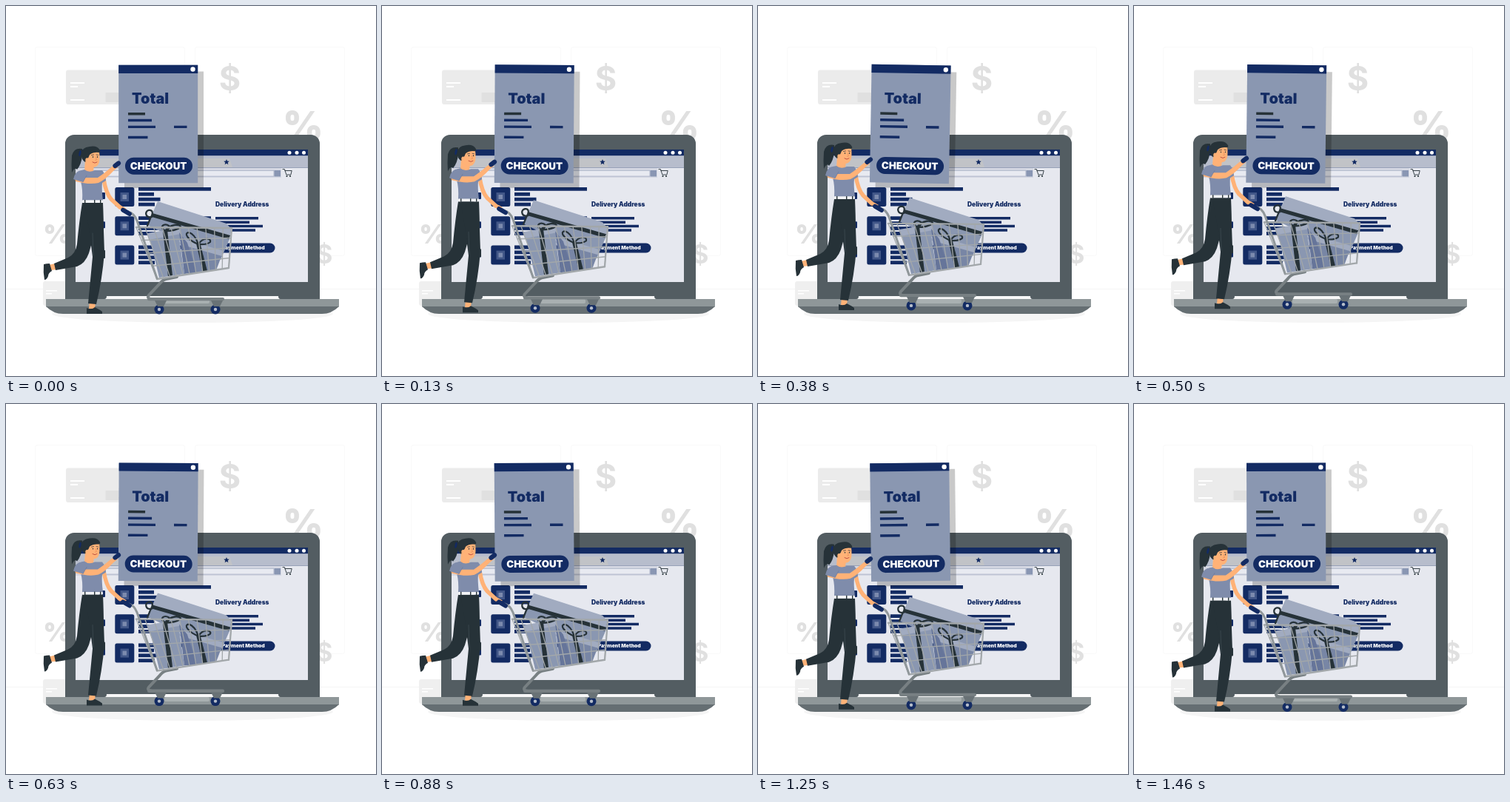
Write an HTML page with a canvas that moves like this. It is 500 px wide and 500 px high and loops after 1500 ms.

```html
<!DOCTYPE html>
<html lang="en">
<head>
<meta charset="utf-8">
<title>Checkout</title>
<style>
  html, body { margin: 0; width: 100%; height: 100%; overflow: hidden; background: #fff; }
  canvas { display: block; width: 500px; height: 500px; }
</style>
</head>
<body>
<canvas id="stage"></canvas>
<script>
const LOOP = 1500;
const NAVY = '#132b63', INK = '#263238', SKIN = '#ffb277', SHIRT = '#7f8cab';
const STEEL = '#535d62', PALE = '#e0e0e0', FAINT = '#ebebeb', DUSK = '#8a97b1';
const canvas = document.getElementById('stage');
const ctx = canvas.getContext('2d');
const ratio = window.devicePixelRatio || 1;
canvas.width = canvas.height = 500 * ratio;

function fill(color, d) {
  ctx.fillStyle = color;
  ctx.fill(new Path2D(d));
}
function stroke(color, width, d, cap = 'round') {
  ctx.strokeStyle = color;
  ctx.lineWidth = width;
  ctx.lineCap = cap;
  ctx.lineJoin = 'round';
  ctx.stroke(new Path2D(d));
}
function box(color, x, y, w, h, r = 0) {
  ctx.fillStyle = color;
  ctx.beginPath();
  ctx.roundRect(x, y, w, h, r);
  ctx.fill();
}
function oval(color, x, y, rx, ry = rx, turn = 0) {
  ctx.fillStyle = color;
  ctx.beginPath();
  ctx.ellipse(x, y, rx, ry, turn, 0, 7);
  ctx.fill();
}
function label(text, x, y, size, color, weight = 900, align = 'center') {
  ctx.font = `${weight} ${size}px Inter, sans-serif`;
  ctx.textAlign = align;
  ctx.fillStyle = color;
  ctx.fillText(text, x, y);
}

function backdrop() {
  ctx.fillStyle = '#fff';
  ctx.fillRect(0, 0, 500, 500);
  ctx.strokeStyle = '#f9f9f9';
  ctx.lineWidth = 1;
  for (const x of [39.5, 255.5]) {
    ctx.beginPath();
    ctx.roundRect(x, 55.5, 202, 282, 3);
    ctx.stroke();
  }
  box('#f0f0f0', 0, 382, 500, 0.7);

  box(FAINT, 81, 86.5, 74, 46.5, 3);
  box(PALE, 134.5, 117, 20, 13);
  box('#fff', 87, 103, 19, 2);
  box('#fff', 87, 108, 10, 2);
  box('#fff', 87, 126, 19, 2);
  box('#efefef', 50, 372, 40, 33, 3);
  box('#fff', 54, 384, 15, 1.5);
  box('#fff', 54, 388, 8, 1.5);

  label('$', 302.5, 114, 45, PALE, 700);
  label('$', 430, 348, 35, PALE, 700);
  label('%', 401.5, 180, 52, PALE, 900);
  label('%', 69, 321, 36, PALE, 900);
}

function laptop() {
  oval('#f5f5f5', 252, 416, 190, 12);
  box('#f7f7f7', 134, 388, 237, 9);
  fill(STEEL, 'M80 396V186A12 12 0 0 1 92 174H412A12 12 0 0 1 424 186V396H371Q368 396 368 392H136Q136 396 133 396Z');
  box('#e6e8ef', 94, 194, 314, 179);

  box(NAVY, 94, 194, 314, 8.5);
  for (const x of [383, 393, 402.5]) oval('#fff', x, 198.3, 2.5);
  box('#b7bdcc', 94, 202.5, 314, 16);
  fill('#c1c3c7', 'M106 218V208Q106 206 108 206H302L306 218Z');
  star(298, 211, 4);
  box('#8490ad', 94, 218.3, 314, 0.8);
  box('#d5d8e3', 94, 219, 314, 13);
  ctx.strokeStyle = '#98a3bb';
  ctx.lineWidth = 0.7;
  ctx.fillStyle = '#e8eaf1';
  ctx.fillRect(112, 222.3, 250, 7.8);
  ctx.strokeRect(112, 222.3, 250, 7.8);
  box('#8996b3', 362.5, 222, 8.5, 8.5);
  box('#e6e8ef', 372, 219, 36, 13);
  stroke(INK, 0.9, 'M374 220.5h2.4l2.5 7.5h6l1.3-5.5h-9.2');
  oval(INK, 379.5, 230, 1.1);
  oval(INK, 384, 230, 1.1);

  for (let row = 0; row < 3; row++) {
    const y = 245 + row * 39.3;
    box(NAVY, 125, y + 7, 9, 9, 1);
    box(NAVY, 147.3, y, 26, 26, 2.5);
    box('#425788', 154.5, y + 7, 11.5, 12);
    box('#7b8aae', 157.5, y + 10, 5.5, 6);
    [98, 21, 29.5, 22].forEach((w, i) => box(NAVY, 179, y + i * 6.9, w, 4.8));
  }

  label('Delivery Address', 283, 270.7, 8.4, NAVY, 900, 'left');
  [58, 46, 64, 54].forEach((w, i) => box(NAVY, 283, 285 + i * 5.4, w, 3.5));
  box(NAVY, 278, 320.5, 85.5, 13, 6.5);
  label('Payment Method', 291.7, 329.4, 6.8, '#fff', 900, 'left');

  box('#8f9799', 54, 396, 396, 10.5);
  box('#a9b0b1', 214, 396, 61, 6, 2);
  fill('#656e72', 'M54 406H450Q440 416 427 416H77Q64 416 54 406Z');
}

function star(x, y, r) {
  ctx.fillStyle = NAVY;
  ctx.beginPath();
  for (let i = 0; i < 10; i++) {
    const a = i * Math.PI / 5 - Math.PI / 2, d = i % 2 ? r * 0.45 : r;
    ctx.lineTo(x + d * Math.cos(a), y + d * Math.sin(a));
  }
  ctx.fill();
}

function receipt(degrees) {
  ctx.save();
  ctx.translate(209.5, 163);
  ctx.rotate(degrees * Math.PI / 180);
  ctx.translate(-209.5, -163);
  box('rgba(0,0,0,.21)', 160, 88.5, 107, 157.5);
  box(DUSK, 152.2, 79.7, 107, 159.6);
  box(NAVY, 152.2, 79.7, 107, 11.2);
  oval('#fff', 252.5, 85.5, 3.2);
  label('Total', 170, 132, 19.8, NAVY, 900, 'left');
  box(INK, 165, 144, 23, 3.5);
  box(NAVY, 165, 152.8, 32, 3.4);
  box(NAVY, 165, 161.7, 37, 3.4);
  box(NAVY, 227, 161.7, 17.5, 3.4);
  box(NAVY, 165, 175.8, 26.5, 3.4);
  box(NAVY, 161, 204.7, 91, 23, 11.5);
  label('CHECKOUT', 206.1, 220.8, 13.3, '#fff');
  ctx.restore();
}

function gifts() {
  // large tilted parcel
  fill(DUSK, 'M191 296L198 280L303 313L290 343Z');
  fill('#a1abc0', 'M205 264L298 294L305 302L302 313L198 280Z');
  fill(INK, 'M198 280L303 310L301 315L197 285Z');
  stroke(INK, 2.3, 'M197 285C188 287 187 277 193 276C199 275 199 281 195 287L191 297');

  // two smaller parcels in front
  fill('#7886a5', 'M238 321L292 336L284 357L246 362Z');
  fill('#a1abc0', 'M236 314L294 331L292 338L235 322Z');
  fill(INK, 'M257 321L263 323L272 358L266 359Z');
  fill(DUSK, 'M194 313L233 306L241 362L207 367Z');
  fill('#a1abc0', 'M191 307L234 300L236 308L193 316Z');
  fill(INK, 'M212 304L218 303L225 364L219 365Z');
  fill('#66759a', 'M234 306L245 320L258 360L241 362Z');
  stroke(INK, 2.4, 'M215 304C206 298 214 293 220 297Q222 301 215 304C222 294 236 294 236 299Q229 304 215 304');
  stroke(INK, 2.2, 'M260 322C247 317 239 307 247 306Q255 308 260 322C267 311 278 314 276 319Q271 323 260 322');
}

function cart() {
  const [tl, tr, br, bl] = [[176, 299], [305, 300], [301, 354], [204, 369]];
  const mix = (a, b, k) => [a[0] + (b[0] - a[0]) * k, a[1] + (b[1] - a[1]) * k];
  const wire = (a, b, w) => stroke('#a2a7aa', w, `M${a}L${b}`);

  box('#788083', 191, 394, 104, 4.3, 2);
  for (const x of [207, 283]) {
    oval(NAVY, x, 410, 6.5);
    oval('#b5bdca', x, 410, 2.2);
    fill('#697276', `M${x - 6} 398h16l-4 8h-8Z`);
  }
  stroke('#788083', 4, 'M231 366L216 369Q212 370 208 375L193 391Q190 395 196 396');

  gifts();

  for (let i = 0; i <= 11; i++) wire(mix(tl, tr, i / 11), mix(bl, br, i / 11), 1.3);
  for (let i = 1; i < 4; i++) wire(mix(tl, bl, i / 4), mix(tr, br, i / 4), 1.3);
  wire(tl, tr, 2.4);
  wire(tr, br, 2.2);
  wire(bl, br, 2.4);
  stroke('#90979a', 3, 'M165 278Q173 280 177 290L204 368');
  stroke(NAVY, 5.8, 'M158.5 276L167 281');
}

function woman() {
  // far arm, resting on the cart handle
  stroke(SKIN, 5.5, 'M132 234Q135 253 142 261L154 272');
  fill(SKIN, 'M149 267L158 271L163 274L159 276L151 273Z');
  stroke(NAVY, 5.5, 'M158 275.5L164 279');

  // raised back foot
  fill(SKIN, 'M70 347L58 350L60 357L70 356Z');
  fill(INK, 'M51 349Q55 348 59 348L62 358Q57 361 57 365Q55 370 52 370Q50 360 51 349Z');
  fill(INK, 'M103 266H124Q122 303 112 334Q107 348 96 352L67 357L65 348L84 340Q94 335 96 322Q99 290 103 266Z');

  // standing leg
  fill(SKIN, 'M113 399H121L120 409H112Z');
  fill(INK, 'M109 408Q116 411 120 407Q128 411 130 413V416H109Z');
  fill(INK, 'M106 266H131Q132 290 132 304L133 333Q130 370 122 403L111 402Q114 370 117 339L112 300Z');
  box(INK, 129, 330, 5, 11, 1);
  stroke('#46535a', 0.6, 'M117 307L118 337');

  // neck, shirt and belt
  fill(SKIN, 'M107 210L119 214L118 225Q112 228 106 222Z');
  fill(SHIRT, 'M106 221Q112 226 120 222L130 222Q135 228 135 236L130 239Q129 246 131 263H103Q104 248 101 237L92 234Q92 224 106 221Z');
  box('#f2f3f6', 102.5, 262.3, 28.5, 3.7, 1);
  for (const x of [106, 119, 127]) box(INK, x, 262, 1.4, 4.3);

  // near arm, reaching for the receipt
  fill(SKIN, 'M93 232Q101 231 107 232L124 232Q133 226 142 218L150 213L151 218L145 223Q135 234 125 239Q113 242 94 237Z');
  fill(SHIRT, 'M104 222Q94 221 91 234L104 238L109 229Z');
  stroke('#66759a', 0.6, 'M104 238L109 229');
  stroke(NAVY, 6.2, 'M147.5 216L152 212.5');

  // head
  fill(INK, 'M103 193Q92 191 89 202Q88 214 89 225Q93 217 96 221Q102 214 103 202Z');
  fill(SKIN, 'M105 200Q107 193 118 194L126 197Q127 206 126 211Q124 218 118 218Q110 217 107 212Z');
  fill(INK, 'M102 200Q102 191 113 190Q123 188 127 195Q128 197 126 198Q118 197 113 201Q112 205 109 207L107 211Q101 207 102 200Z');
  oval(SKIN, 109.5, 208, 2.2, 2.7);
  oval(NAVY, 100, 199, 1.5, 4, 0.2);
  oval(INK, 117.5, 204, 0.7, 0.9);
  oval(INK, 123.5, 204, 0.7, 0.9);
  stroke(INK, 0.7, 'M115.5 201.6L118.5 201M122 201L124.5 201.5');
  stroke('#e58b58', 0.7, 'M121 204L122.5 208L120.5 208.3');
  stroke('#b8473d', 0.9, 'M117 211Q120 213.5 123 211');
}

function draw(now) {
  const p = (now % LOOP) / LOOP;
  const lift = 10 * (1 - Math.abs(2 * p - 1));
  const tilt = p < 0.25 ? 4 * p : p < 0.75 ? 2 - 4 * p : 4 * p - 4;
  ctx.setTransform(ratio, 0, 0, ratio, 0, 0);
  backdrop();
  laptop();
  receipt(tilt);
  ctx.translate(0, -lift);
  cart();
  woman();
  requestAnimationFrame(draw);
}
requestAnimationFrame(draw);
</script>
</body>
</html>
```
